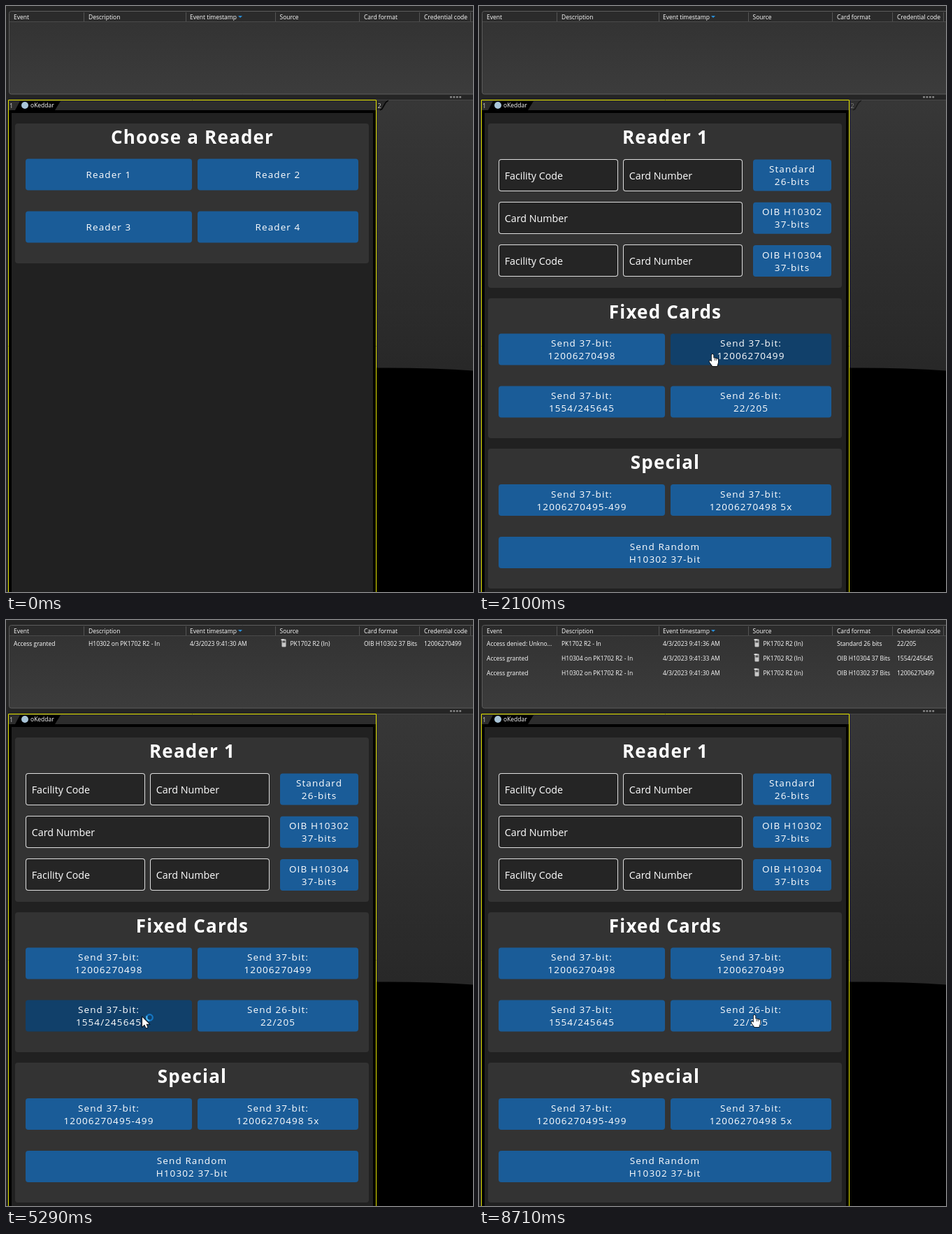
Animation, 668 px wide and 838 px high, one loop 9640 ms. Source, as an HTML page with a canvas:

```html
<!DOCTYPE html>
<html lang="en">
<head>
<meta charset="utf-8">
<title>Card reader simulator</title>
<style>
html, body { margin: 0; width: 100%; height: 100%; overflow: hidden; background: #252525; }
canvas { display: block; }
</style>
</head>
<body>
<canvas id="stage" width="668" height="838"></canvas>
<script>
const ctx = document.getElementById('stage').getContext('2d');
const LOOP = 9640, PAGE_CHANGE = 1290;
const BLUE = '#1a5c98', PRESSED = '#11406a';

// Table columns: x, title
const columns = [[11, 'Event'], [118, 'Description'], [263, 'Event timestamp'],
  [391.5, 'Source'], [512, 'Card format'], [598, 'Credential code']];
const logEntry = (at, event, description, second, format, code) => ({ at, cells:
  [event, description, `4/3/2023 9:41:${second} AM`, 'PK1702 R2 (In)', format, code] });
const log = [
  logEntry(8570, 'Access denied: Unkno...', 'PK1702 R2 - In', 36, 'Standard 26 bits', '22/205'),
  logEntry(5800, 'Access granted', 'H10304 on PK1702 R2 - In', 33, 'OIB H10304 37 Bits', '1554/245645'),
  logEntry(2800, 'Access granted', 'H10302 on PK1702 R2 - In', 30, 'OIB H10302 37 Bits', '12006270499')
];

// Cards: y, height, title. Buttons: x, y, width, lines. Inputs: x, y, width, label
const menuPage = {
  cards: [[168, 200, 'Choose a Reader']],
  inputs: [],
  buttons: [1, 2, 3, 4].map(n => [n % 2 ? 28 : 274, n < 3 ? 218.5 : 293.5,
    n % 2 ? 238 : 230, [`Reader ${n}`]])
};
const readerPage = {
  cards: [[168, 235, 'Reader 1'], [418, 200, 'Fixed Cards'], [633, 200, 'Special']],
  inputs: [
    [28, 219, 171, 'Facility Code'], [206, 219, 171, 'Card Number'],
    [28, 280, 349, 'Card Number'],
    [28, 341, 171, 'Facility Code'], [206, 341, 171, 'Card Number']
  ],
  buttons: [
    [392, 219.5, 112, ['Standard', '26-bits']],
    [392, 280.8, 112, ['OIB H10302', '37-bits']],
    [392, 342, 112, ['OIB H10304', '37-bits']],
    [28, 468.5, 238, ['Send 37-bit:', '12006270498']],
    [274, 468.5, 230, ['Send 37-bit:', '12006270499']],
    [28, 543.5, 238, ['Send 37-bit:', '1554/245645']],
    [274, 543.5, 230, ['Send 26-bit:', '22/205']],
    [28, 684, 238, ['Send 37-bit:', '12006270495-499']],
    [274, 684, 230, ['Send 37-bit:', '12006270498 5x']],
    [28, 759, 476, ['Send Random', 'H10302 37-bit']]
  ]
};

// Pointer track: time, x, y
const track = [
  [260, 350, 838], [450, 270, 560], [600, 200, 375], [880, 180, 250],
  [1550, 180, 250], [1780, 215, 400], [1930, 245, 480], [2100, 334, 498],
  [3000, 334, 498], [3140, 270, 545], [3280, 215, 567], [3490, 195, 568],
  [5920, 195, 568], [6130, 240, 570], [6690, 343, 586], [6900, 375, 578], [7110, 394, 565]
];
const ARROW = new Path2D('M0 0V13.5L3.2 10.6L5.4 15.4L7.6 14.4L5.5 9.8H9.8Z');
const HAND = new Path2D('M-1.2 1.2Q-1 0 0 0T1.4 1.2V5.2L6.5 6.2Q8 6.6 8 8.2V12L6.5 17H0L-4.2 11Q-4.8 9.4 -3.6 9L-1.2 10.6Z');

const between = (t, from, to) => t >= from && t < to;
const hit = ([x, y, w], p, h) => between(p.x, x, x + w) && between(p.y, y, y + h);

function fill(color, x, y, w, h, radius = 0) {
  ctx.fillStyle = color;
  ctx.beginPath();
  ctx.roundRect(x, y, w, h, radius);
  ctx.fill();
}

function line(color, width, ...points) {
  ctx.strokeStyle = color;
  ctx.lineWidth = width;
  ctx.beginPath();
  points.forEach(([x, y]) => ctx.lineTo(x, y));
  ctx.stroke();
}

function polygon(color, ...points) {
  ctx.fillStyle = color;
  ctx.beginPath();
  points.forEach(([x, y]) => ctx.lineTo(x, y));
  ctx.fill();
}

function gradient(y0, y1, from, to) {
  const g = ctx.createLinearGradient(0, y0, 0, y1);
  g.addColorStop(0, from);
  g.addColorStop(1, to);
  return g;
}

function text(string, x, y, size, { align = 'left', weight = 400, spacing = 0, color = '#fff' } = {}) {
  ctx.font = `${weight} ${size}px "Open Sans", sans-serif`;
  ctx.letterSpacing = spacing + 'px';
  ctx.textAlign = align;
  ctx.fillStyle = color;
  ctx.fillText(string, x, y);
}

function drawTable(t) {
  fill(gradient(22, 126, '#333', '#3c3c3c'), 5, 8, 680, 118, 3);
  fill('#2b2b2b', 5, 8, 680, 14, [3, 0, 0, 0]);
  line('#4a4a4a', 1, [5, 22.5], [668, 22.5]);
  ctx.strokeStyle = '#5c5c5c';
  ctx.beginPath();
  ctx.roundRect(4.5, 7.5, 680, 118.5, 3);
  ctx.stroke();
  for (const x of [111.5, 257.5, 385.5, 505.5, 591.5, 664.5]) line('#555', 1, [x, 9], [x, 22]);
  for (const [x, title] of columns) text(title, x, 18.5, 8.5);
  polygon('#2a8fd8', [332, 14], [338, 14], [335, 17]);

  log.filter(entry => t >= entry.at).forEach(({ cells }, row) => {
    const y = 36.5 + row * 21;
    cells.forEach((cell, i) => text(cell, i === 3 ? 406.5 : columns[i][0], y, 8.5));
    fill('#c8c8c8', 394.5, y - 9, 6, 11, 1);
    fill('#555', 395.5, y - 7, 4, 3);
    fill('#f0f0f0', 393.5, y - 9, 4, 1.5);
  });
  for (let i = 0; i < 4; i++) fill('#8a8a8a', 635 + i * 4.4, 129, 3, 2.5, 1);
}

function drawTiles(t) {
  fill(gradient(134, 520, '#373737', '#282828'), 530, 134, 138, 704);
  ctx.fillStyle = '#000';
  ctx.beginPath();
  ctx.moveTo(530, 517.5);
  ctx.quadraticCurveTo(605, 517, 668, 521.5);
  ctx.lineTo(668, 838);
  ctx.lineTo(530, 838);
  ctx.fill();
  line('#484848', 1, [530, 134.5], [668, 134.5]);

  ctx.globalAlpha = Math.min(1, Math.max(0, (2240 - t) / 280));
  polygon('#2a2a2a', [530, 135], [547, 135], [538, 149], [530, 149]);
  line('#000', 1.2, [547, 135], [543, 138], [538, 147], [535, 149]);
  text('2', 531.5, 145.5, 9, { color: '#ccc' });
  ctx.globalAlpha = 1;

  fill('#000', 3, 134, 527, 710);
  fill('#2d2d2d', 4, 135, 525, 14);
  fill('#212121', 8, 153, 517, 685);
  line('#e6e600', 1, [3.5, 838], [3.5, 134.5], [529.5, 134.5], [529.5, 838]);
  polygon('#000', [13, 149], [20, 136], [78, 136], [70, 149]);
  text('1', 5, 145.5, 9, { color: '#ccc' });
  ctx.fillStyle = '#a9c5d8';
  ctx.beginPath();
  ctx.arc(27, 142, 5, 0, 7);
  ctx.fill();
  text('oKeddar', 35, 145.3, 8.5);
}

function drawPage(page, pressed) {
  for (const [y, h, title] of page.cards) {
    fill('#333', 13, y, 506, h, 4);
    text(title, 266.5, y + 28.5, 26, { align: 'center', weight: 700, spacing: 1.2 });
  }
  for (const [x, y, w, label] of page.inputs) {
    fill('#dedede', x, y, w, 46, 4);
    fill('#252525', x + 1, y + 1, w - 2, 44, 3);
    text(label, x + 8.7, y + 29, 14.3);
  }
  for (const button of page.buttons) {
    const [x, y, w, lines] = button;
    fill(button === pressed ? PRESSED : BLUE, x, y, w, 45, 4);
    lines.forEach((label, i) => text(label, x + w / 2, y + (lines.length > 1 ? 18.5 : 27.5) + i * 18,
      13.5, { align: 'center', spacing: 1.1 }));
  }
}

function pointerAt(t) {
  const next = track.findIndex(key => key[0] > t);
  if (next < 0) return { x: track.at(-1)[1], y: track.at(-1)[2] };
  const [t0, x0, y0] = track[next - 1], [t1, x1, y1] = track[next];
  const k = (t - t0) / (t1 - t0);
  return { x: x0 + (x1 - x0) * k, y: y0 + (y1 - y0) * k };
}

function drawPointer(t, { x, y }, shape) {
  ctx.save();
  ctx.translate(Math.round(x), Math.round(y));
  if (shape === 'beam') {
    for (const [color, width] of [['#000', 2.4], ['#ccc', 1]]) {
      line(color, width, [-2, -5.5], [3, -5.5]);
      line(color, width, [0.5, -5.5], [0.5, 5.5]);
      line(color, width, [-2, 5.5], [3, 5.5]);
    }
  } else {
    const path = shape === 'hand' ? HAND : ARROW;
    ctx.strokeStyle = '#000';
    ctx.lineWidth = 1.5;
    ctx.stroke(path);
    ctx.fillStyle = '#fff';
    ctx.fill(path);
    if (shape === 'hand') for (const dx of [3.2, 5.4]) line('#000', 0.7, [dx, 6], [dx, 9]);
  }
  if (shape === 'busy') {
    const turn = t / 160;
    ctx.lineWidth = 2.2;
    for (const [color, start, sweep] of [['#1577c4', 0, 7], ['#4ab8f5', turn, 2]]) {
      ctx.strokeStyle = color;
      ctx.beginPath();
      ctx.arc(10.5, 0.5, 4.3, start, start + sweep);
      ctx.stroke();
    }
  }
  ctx.restore();
}

function draw(now) {
  const t = now % LOOP;
  const page = t < PAGE_CHANGE ? menuPage : readerPage;
  const pointer = t >= track[0][0] ? pointerAt(t) : null;
  const hovered = pointer && page.buttons.find(b => hit(b, pointer, 45));
  // A reply from the reader releases the button until the pointer moves again
  const released = between(t, 2800, 3000) || between(t, 5800, 5920) || t >= 8570;
  const busy = between(t, 2240, 2800) || between(t, 3820, 5780);

  fill('#252525', 0, 0, 668, 838);
  drawTable(t);
  drawTiles(t);
  drawPage(page, released ? null : hovered);
  if (pointer) {
    const typing = between(t, 1150, PAGE_CHANGE) || page.inputs.some(i => hit(i, pointer, 46));
    drawPointer(t, pointer, busy ? 'busy' : typing ? 'beam' : hovered ? 'hand' : 'arrow');
  }
}

function tick() {
  draw(performance.now());
  requestAnimationFrame(tick);
}
tick();
</script>
</body>
</html>
```
